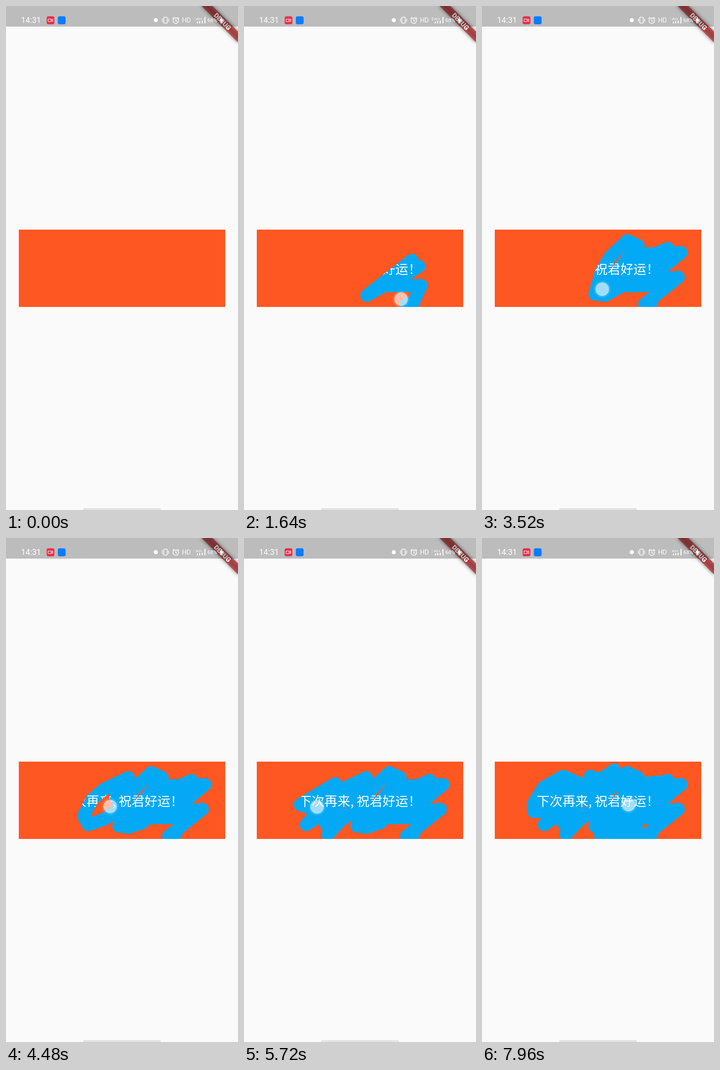
These frames come from a looping animation (508x1102 px, 8000 ms). An HTML page:

```html
<!DOCTYPE html>
<html lang="zh-CN">
<head>
<meta charset="utf-8">
<title>Scratch card</title>
<style>
  html, body { margin: 0; width: 100%; height: 100%; overflow: hidden; background: #fafafa; }
  svg { display: block; width: 100vw; height: 100vh; }
  .ui { font-family: Roboto, "Noto Sans", sans-serif; fill: #fff; }
  .prize { font: 400 28.22px "Noto Sans CJK SC", "Noto Sans CJK", sans-serif; fill: #fff; }
  .line { fill: none; stroke: #fff; stroke-width: 1.5; stroke-linecap: round; stroke-linejoin: round; }
</style>
</head>
<body>
<svg viewBox="0 0 508 1102" preserveAspectRatio="none">
  <defs>
    <mask id="scratched" maskUnits="userSpaceOnUse" x="28" y="489" width="452" height="169">
      <path id="trail" fill="none" stroke="#fff" stroke-width="28.2" stroke-linecap="round" stroke-linejoin="round"/>
    </mask>
    <radialGradient id="glow">
      <stop offset="0" stop-color="#fff" stop-opacity=".6"/>
      <stop offset=".7" stop-color="#fff" stop-opacity=".64"/>
      <stop offset=".76" stop-color="#fff" stop-opacity=".2"/>
      <stop offset="1" stop-color="#fff" stop-opacity="0"/>
    </radialGradient>
    <filter id="soft" x="-20%" y="-80%" width="140%" height="260%">
      <feGaussianBlur stdDeviation="3"/>
    </filter>
  </defs>

  <rect width="508" height="1102" fill="#fafafa"/>

  <!-- scratch card -->
  <rect x="28" y="489" width="452" height="169" fill="#ff5722"/>
  <g mask="url(#scratched)">
    <rect x="28" y="489" width="452" height="169" fill="#03a9f4"/>
    <text class="prize" x="119.8" y="586">下次再来, 祝君好运！</text>
  </g>

  <!-- corner ribbon -->
  <g transform="translate(508 0) rotate(45) scale(1.411)">
    <rect x="-40" y="28" width="80" height="12" fill="#000" opacity=".5" filter="url(#soft)"/>
    <rect x="-40" y="28" width="80" height="12" fill="#b71c1c" opacity=".63"/>
    <text class="ui" x="0" y="37.6" text-anchor="middle" font-size="10.2" font-weight="900">DEBUG</text>
  </g>

  <!-- status bar -->
  <rect width="508" height="45" fill="#000" opacity=".25"/>
  <g class="ui">
    <text x="33" y="37" font-size="17.5">14:31</text>
    <rect x="89" y="22.5" width="17" height="17.5" rx="4" fill="#e8304f"/>
    <rect x="113.5" y="22.5" width="17" height="17.5" rx="4" fill="#0a7cff"/>
    <circle cx="328" cy="31" r="4.5"/>
    <text x="385.5" y="36.3" font-size="14">HD</text>
    <text x="415.5" y="31" font-size="8">4G+</text>
    <text x="441" y="35.2" font-size="11.5">68%</text>
    <path d="M418 34h2.2v4h-2.2zM423 33h2.2v5h-2.2zM428.500 32h2.200v6h-2.200zM434.500 24h2.200v14h-2.200z"/>
    <path d="M472.500 24l-6 8h4l-1 7 7-9h-4z"/>
    <path id="net" d="M410.500 27l2-2.500 2 2.500zM410.500 29.500h4l-2 2.500z"/>
  </g>
  <g class="line">
    <path d="M92.500 28.500h6.500v5.500h-6.500zM99 30.500l3.500-2v5.500l-3.500-2" stroke-width="1"/>
    <rect x="345.500" y="24.500" width="7.500" height="13" rx="1"/>
    <path d="M342.500 28v6M356 28v6"/>
    <circle cx="371.800" cy="32" r="6"/>
    <path d="M371.800 28.500v4l2.500 1M364.800 27.500l3-2.800M378.800 27.500l-3-2.800"/>
  </g>

  <circle id="touch" r="20" fill="url(#glow)"/>
  <rect x="169" y="1098" width="170" height="8" rx="3" fill="#e3e3e3"/>
</svg>

<script>
const LOOP = 8000;

// Each leg: end time, then the x,y points swept at even speed.
const legs = [
  [760, "368,556"],
  [1540, "269,633 383,569 318,612 388,611 360,671"],
  [1640, "356,652"],
  [2520, "430,593 345,600 306,574 407,530 345,575 392,575 436,539 354,542"],
  [4480, "275,606 342,524 318,513 281,548 262,580 247,630 270,632 300,622 255,600 " +
         "240,565 268,524 215,549 188,572 170,608 180,627 215,615 240,598"],
  [5720, "246,580 215,573 136,627 205,550 184,648 222,607 185,588 200,537 123,583 172,599"],
  [6960, "113,598 112,582 135,545 177,521 203,532 235,545 290,507 340,622 397,533 300,540 237,521"],
  [7960, "260,652 335,610 290,655 350,650 340,650 333,594"]
];

const gap = (a, b) => Math.hypot(b.x - a.x, b.y - a.y);

function buildKeys() {
  const keys = [];
  for (const [end, text] of legs) {
    const pts = text.split(" ").map(p => {
      const [x, y] = p.split(",").map(Number);
      return { x, y };
    });
    const last = keys[keys.length - 1];
    if (!last) {
      keys.push({ ...pts[0], t: end });
      continue;
    }
    const steps = pts.map((p, i) => gap(i ? pts[i - 1] : last, p));
    const total = steps.reduce((a, b) => a + b, 0);
    let done = 0;
    pts.forEach((p, i) => {
      done += steps[i];
      keys.push({ ...p, t: last.t + (end - last.t) * done / total });
    });
  }
  return keys;
}

const keys = buildKeys();
const trail = document.getElementById("trail");
const touch = document.getElementById("touch");
const net = document.getElementById("net");

function draw(t) {
  const on = t >= keys[0].t;
  touch.style.display = on ? "" : "none";
  net.style.opacity = t > 1000 && t < 3280 ? 1 : 0.3;
  if (!on) {
    trail.setAttribute("d", "");
    return;
  }
  const past = keys.filter(k => k.t <= t);
  const a = past[past.length - 1];
  const b = keys[past.length] || a;
  const f = b === a ? 0 : (t - a.t) / (b.t - a.t);
  const x = a.x + (b.x - a.x) * f;
  const y = a.y + (b.y - a.y) * f;
  trail.setAttribute("d", "M" + past.map(k => k.x + " " + k.y).join("L") + `L${x} ${y}`);
  touch.setAttribute("transform", `translate(${x - 12} ${y - 11})`);
}

const start = performance.now();
function tick() {
  const t = (performance.now() - start) % LOOP;
  draw(Math.floor(t / 40) * 40);
  requestAnimationFrame(tick);
}
tick();
</script>
</body>
</html>
```
